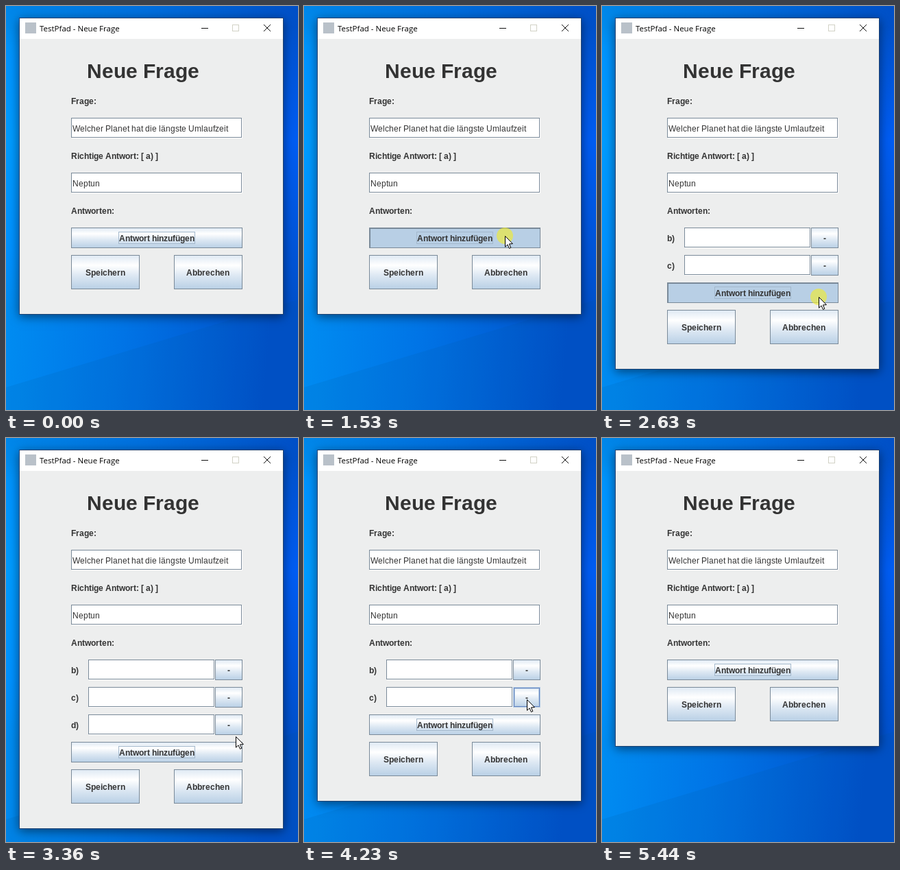
Write an HTML page with a canvas that moves like this. It is 426 by 589 pixels and loops after 6230 ms.

```html
<!DOCTYPE html>
<html lang="de">
<head>
<meta charset="utf-8">
<title>Neue Frage</title>
<style>
  html, body { margin: 0; width: 100%; height: 100%; overflow: hidden; background: #0070e6; }
  canvas { display: block; width: 426px; height: 589px; }
</style>
</head>
<body>
<canvas id="stage" width="426" height="589"></canvas>
<script>
const W = 426, H = 589, LOOP = 6230;
const TICK = 1000 / 15, MOVE = 5 * TICK, PRESS = 130, LEAVE = 5440;
const ROW = 40, LEFT = 95, FORM_W = 250, LIST_Y = 323;
const ctx = document.getElementById('stage').getContext('2d');

const SANS = '"Liberation Sans", Arial, sans-serif';
const BOLD = `bold 12px ${SANS}`;
const PLAIN = `12px ${SANS}`;
const INK = '#333333', PANEL = '#edeeee', EDGE = '#7a8a99';
const LIGHT = '#b8cfe5', ACCENT = '#6382bf';

// The pointer sets off for each stop, may press there, and a release adds or removes a row
const ENTRY = { x: 416, y: 388 };
const STOPS = [
  { from: 530, x: 293, y: 335, press: 1460, add: 1 },
  { from: 1590, x: 289, y: 382, press: 2080, add: 1 },
  { from: 2210, x: 316, y: 424, press: 2630, add: 1 },
  { from: 2760, x: 335, y: 435 },
  { from: 3360, x: 326, y: 421, press: 3760, add: -1 },
  { from: 3890, x: 325, y: 381, press: 4290, add: -1 },
  { from: 4420, x: 325, y: 342, press: 5240, add: -1 }
];

const smooth = p => p * p * (3 - 2 * p);

function rowsAt(t) {
  return STOPS.filter(s => t >= s.press + PRESS).reduce((n, s) => n + s.add, 0);
}

function pointerAt(t) {
  const i = STOPS.findLastIndex(s => t >= s.from);
  if (i < 0 || t >= LEAVE) return null;
  const a = STOPS[i - 1] || ENTRY, b = STOPS[i];
  const elapsed = Math.floor((t - b.from) / TICK + 0.01) * TICK;
  const e = smooth(Math.min(1, elapsed / MOVE));
  return {
    x: Math.round(a.x + (b.x - a.x) * e),
    y: Math.round(a.y + (b.y - a.y) * e),
    down: t >= b.press && t < b.press + PRESS
  };
}

function fill(color, x, y, w, h) {
  ctx.fillStyle = color;
  ctx.fillRect(x, y, w, h);
}

function frame(color, x, y, w, h) {
  ctx.strokeStyle = color;
  ctx.lineWidth = 1;
  ctx.strokeRect(x + 0.5, y + 0.5, w - 1, h - 1);
}

function shape(points, x = 0, y = 0) {
  ctx.beginPath();
  points.forEach(([dx, dy]) => ctx.lineTo(x + dx, y + dy));
  ctx.closePath();
}

function gradient(x1, y0, y1, stops) {
  const g = ctx.createLinearGradient(0, y0, x1, y1);
  stops.forEach(([at, color]) => g.addColorStop(at, color));
  return g;
}

// Glyphs advance by whole pixels
const advance = ch => Math.round(ctx.measureText(ch).width);

function textWidth(str, font) {
  ctx.font = font;
  return [...str].reduce((sum, ch) => sum + advance(ch), 0);
}

function text(str, x, y, font = BOLD) {
  ctx.font = font;
  ctx.fillStyle = INK;
  for (const ch of str) {
    ctx.fillText(ch, x, y);
    x += advance(ch);
  }
}

function wallpaper() {
  fill(gradient(W, 0, 40, [[0, '#0092f4'], [0.5, '#0074e6'], [1, '#0050cb']]), 0, 0, W, H);
  fill(gradient(0, 0, 60, [[0, 'rgba(0,70,170,.16)'], [1, 'rgba(0,70,170,0)']]), 0, 0, W, 60);
  ctx.globalCompositeOperation = 'lighter';
  fill(gradient(0, 30, 440, [[0, '#000000'], [0.4, '#000c28'], [1, '#000000']]), 0, 30, W, 410);
  ctx.globalCompositeOperation = 'source-over';
  shape([[0, 556], [W, 428], [W, H], [0, H]]);
  ctx.fillStyle = 'rgba(0,80,150,.12)';
  ctx.fill();
}

function windowFrame(bottom) {
  ctx.save();
  ctx.shadowColor = 'rgba(0,0,0,.5)';
  ctx.shadowBlur = 14;
  ctx.shadowOffsetY = 3;
  fill('#1d4272', 19, 17, 386, bottom - 16);
  ctx.restore();
  fill('#ffffff', 20, 18, 384, 30);
  fill(PANEL, 20, 48, 384, bottom - 48);

  fill('#b9c1c9', 28, 24, 16, 16);
  ctx.font = '11.5px "Open Sans", "Noto Sans", sans-serif';
  ctx.fillStyle = '#000000';
  ctx.fillText('TestPfad - Neue Frage', 49, 37);
  fill('#111111', 285, 32, 10, 1);
  frame('#d2d2c6', 330, 27, 10, 10);
  ctx.strokeStyle = '#111111';
  for (const dir of [-1, 1]) {
    shape([[-5 * dir, -5], [5 * dir, 5]], 381, 32);
    ctx.stroke();
  }
}

function field(x, y, w, str = '') {
  fill('#ffffff', x + 1, y + 1, w - 1, 29);
  frame(EDGE, x, y, w - 1, 29);
  text(str, x + 2, y + 20, PLAIN);
}

function button({ label, x, y, w, h }, { hover, down, focus }) {
  const stops = [[0, '#dde8f3'], [0.3, '#ffffff'], [0.6, '#dde8f3'], [1, LIGHT]];
  fill(down ? LIGHT : gradient(0, y, y + h, stops), x, y, w, h);
  if (down) {
    frame(EDGE, x, y, w, h);
    fill(EDGE, x, y, w, 2);
    fill(EDGE, x, y, 2, h);
  } else if (hover) {
    [LIGHT, ACCENT, LIGHT].forEach((c, i) => frame(c, x + i, y + i, w - 2 * i, h - 2 * i));
  } else {
    frame(EDGE, x, y, w, h);
  }
  const tw = textWidth(label, BOLD);
  const tx = x + Math.floor((w - tw) / 2), mid = y + h / 2;
  text(label, tx, mid + 5);
  if (focus) frame('#a3b8cc', tx - 1, mid - 9, tw + 2, 18);
}

function pointer({ x, y, down }) {
  if (down) {
    ctx.fillStyle = 'rgba(240,235,50,.65)';
    ctx.beginPath();
    ctx.arc(x, y, 12, 0, Math.PI * 2);
    ctx.fill();
  }
  shape([[0.5, 0.5], [0.5, 16.2], [4, 12.8], [6.5, 18.4], [8.8, 17.4], [6.4, 11.9], [11.4, 11.6]], x, y);
  ctx.fillStyle = '#ffffff';
  ctx.fill();
  ctx.strokeStyle = '#000000';
  ctx.lineWidth = 1;
  ctx.stroke();
}

function draw(t) {
  const rows = rowsAt(t), listEnd = LIST_Y + rows * ROW;
  const tip = pointerAt(t);

  wallpaper();
  windowFrame(listEnd + 126);
  text('Neue Frage', 118, 105, `bold 30px ${SANS}`);
  ['Frage:', 'Richtige Antwort: [ a) ]', 'Antworten:'].forEach((s, i) => text(s, LEFT, 143 + 80 * i));
  field(LEFT, 163, FORM_W, 'Welcher Planet hat die längste Umlaufzeit');
  field(LEFT, 243, FORM_W, 'Neptun');

  const add = { label: 'Antwort hinzufügen', x: LEFT, y: listEnd, w: FORM_W, h: 30 };
  const buttons = [
    add,
    { label: 'Speichern', x: LEFT, y: listEnd + ROW, w: 100, h: 50 },
    { label: 'Abbrechen', x: 245, y: listEnd + ROW, w: 100, h: 50 }
  ];
  for (let i = 0; i < rows; i++) {
    const y = LIST_Y + i * ROW;
    text('bcd'[i] + ')', LEFT, y + 20);
    field(120, y, 185);
    buttons.push({ label: '-', x: 305, y, w: 40, h: 30 });
  }

  const under = tip && buttons.find(b =>
    tip.x >= b.x && tip.x < b.x + b.w && tip.y >= b.y && tip.y < b.y + b.h);
  const focused = under && tip.down ? under : add;
  for (const b of buttons) {
    const hover = b === under;
    button(b, { hover, down: hover && tip.down, focus: b === focused });
  }
  if (tip) pointer(tip);
}

const start = performance.now();
function tick() {
  draw((performance.now() - start) % LOOP);
  requestAnimationFrame(tick);
}
tick();
</script>
</body>
</html>
```
